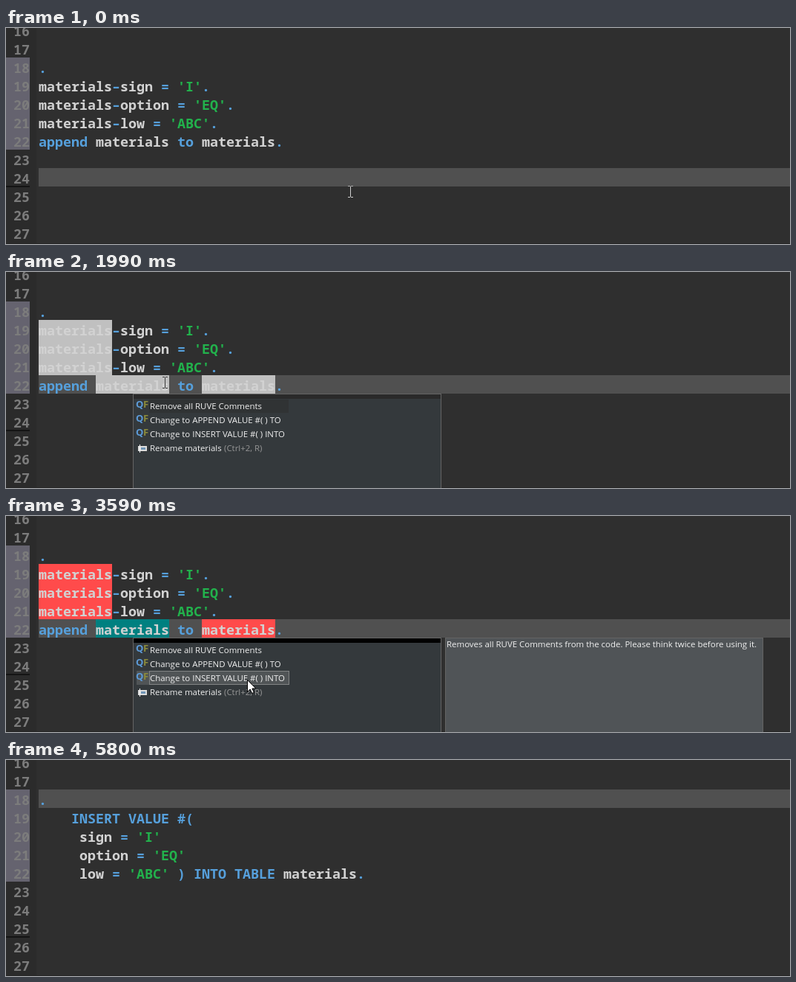
An HTML page with a canvas for the animation above (5860 ms loop, 1057 by 293 pixels).

```html
<!DOCTYPE html>
<html lang="en">
<head>
<meta charset="utf-8">
<title>Code editor quick fix</title>
<style>
html, body { margin: 0; width: 100%; height: 100%; overflow: hidden; background: #2f2f2f; }
canvas { display: block; }
</style>
</head>
<body>
<canvas id="stage" width="1057" height="293"></canvas>
<script>
const ctx = document.getElementById('stage').getContext('2d');
const W = 1057, H = 293, LOOP = 5860, STEP = 70;
const LEFT = 44, CHAR = 11, LINE = 25, ROW = 19;
const MONO = '600 18.333px "Noto Sans Mono", "DejaVu Sans Mono", monospace';
const UI = '11.45px "Open Sans", "Noto Sans", sans-serif';
const ICON = 'bold 13px "Open Sans", sans-serif';
const PLAIN = '#d2d2d2', BLUE = '#56a0dc', GREEN = '#22b24c';
const CARET = '#d0d0d0', BORDER = '#646464';

// Key moments in ms
const T = {
  click: 690, mark: 1840, menu: 1910, info: 2500, occur: 2780, focus: 3190,
  pick: 3260, infoOff: 3720, press: 3850, close: 4190, replace: 4400, colour: 5270
};

const before = [
  '.',
  "materials-sign = 'I'.",
  "materials-option = 'EQ'.",
  "materials-low = 'ABC'.",
  'append materials to materials.'
];
const after = [
  '.',
  '    INSERT VALUE #(',
  "     sign = 'I'",
  "     option = 'EQ'",
  "     low = 'ABC' ) INTO TABLE materials."
];
const menu = [
  'Remove all RUVE Comments',
  'Change to APPEND VALUE #( ) TO',
  'Change to INSERT VALUE #( ) INTO',
  'Rename materials'
];
const infoText = 'Removes all RUVE Comments from the code. Please think twice before using it.';

// Pointer moves: start, end, target point, upward bow
const moves = [
  [0, 620, 165, 155, 25],
  [960, 1170, 125, 164],
  [1500, 1660, 219, 151],
  [T.mark, T.menu, 214, 150],
  [T.info - STEP, T.info, 250, 154],
  [T.info, 2990, 161, 148],
  [T.focus - STEP, T.pick, 326, 222],
  [T.close + STEP, 4540, 333, 275]
];

const lineY = n => 40 + LINE * (n - 18);
const within = (t, a, b) => t >= a && t < b;

function pointerAt(t) {
  let x = 464, y = 222;
  for (const [a, b, toX, toY, bow = 0] of moves) {
    if (t < a) break;
    const u = t >= b ? 1 : Math.floor((t - a) / STEP) * STEP / (b - a);
    const ease = (1 - Math.cos(Math.PI * u)) / 2;
    x += (toX - x) * ease;
    y += (toY - y) * ease - bow * Math.sin(Math.PI * u);
  }
  return [Math.round(x), Math.round(y)];
}

function box(x, y, w, h, fill) {
  ctx.fillStyle = fill;
  ctx.fillRect(x, y, w, h);
}

function frame(x, y, w, h, stroke) {
  ctx.strokeStyle = stroke;
  ctx.strokeRect(x + .5, y + .5, w - 1, h - 1);
}

function text(str, x, y, fill, font) {
  ctx.font = font;
  ctx.fillStyle = fill;
  ctx.fillText(str, x, y);
}

function tokenColour(s) {
  if (s[0] === "'") return GREEN;
  return /^(append|to|INSERT|VALUE|INTO|TABLE|[^\w])$/.test(s) ? BLUE : PLAIN;
}

function drawCode(lines, coloured) {
  lines.forEach((line, i) => {
    for (const { 0: token, index } of line.matchAll(/'[^']*'|\w+|[^\w\s]/g)) {
      // The editor font has a hyphen as wide as its cell
      text(token === '-' ? '–' : token, LEFT + index * CHAR, lineY(18 + i) + 21,
        coloured ? tokenColour(token) : PLAIN, MONO);
    }
  });
}

function drawMarks(t) {
  before.forEach((line, i) => {
    for (const { index } of line.matchAll(/materials/g)) {
      const own = line.startsWith('append') && index < 10;
      const fill = t < T.occur ? '#c0c0c0' : own ? '#008080' : '#ff4b4b';
      box(LEFT + index * CHAR, lineY(18 + i), 9 * CHAR, LINE, fill);
    }
  });
}

function drawGutter(t) {
  box(0, 0, 41, H, '#2b2b2b');
  box(0, lineY(18), 32, 5 * LINE, '#65636f');
  box(0, lineY(t < T.replace ? 25 : 26) - 1, 32, 2, '#141414');
  for (let n = 16; n <= 27; n++) text(n, 10, lineY(n) + 21, '#7c7c7c', MONO);
}

function drawCaret(t) {
  const caret = (from, to, x, line, fill = CARET) =>
    within(t, from, to) && box(x, lineY(line), 2, LINE, fill);
  caret(350, T.click, LEFT, 24);
  caret(T.click, 1370, 165, 22);
  caret(T.info, T.occur, 165, 22, '#484848');
  caret(4610, 5800, LEFT + CHAR, 18);
}

function drawMenu(t) {
  box(171, 165, 416, 128, '#34393c');
  box(172, 166, 414, 6, t < T.focus ? '#2a2a2a' : '#000');
  frame(171, 165, 416, 140, BORDER);
  if (t < T.pick) box(193, 173, 188, 18, '#303334');
  else {
    box(176, 210, 206, ROW, '#505456');
    ctx.setLineDash([1, 1]);
    frame(193, 210, 189, ROW, '#b4b4b4');
    ctx.setLineDash([]);
  }
  menu.forEach((label, i) => {
    const y = 186 + ROW * i;
    text(label, 194, y, '#f0f0f0', UI);
    if (label.startsWith('Rename')) {
      box(178, y - 7, 12, 7, '#dcdcdc');
      box(182, y - 5, 6, 3, '#6f94b5');
      box(180, y - 9, 1, 11, '#f4f4f4');
      text('(Ctrl+2, R)', 294, y, '#969696', UI);
    } else {
      text('Q', 175, y - 2, '#5d9bd8', ICON);
      text('F', 185, y - 2, '#8c8c3c', ICON);
    }
  });
}

function drawInfo() {
  box(592, 165, 429, 128, '#505457');
  frame(592, 165, 429, 140, BORDER);
  text(infoText, 594, 178, '#f0f0f0', UI);
}

function drawClick(x, y) {
  ctx.fillStyle = 'rgba(255,255,0,.47)';
  ctx.beginPath();
  ctx.arc(x, y, 12, 0, Math.PI * 2);
  ctx.fill();
}

// Text pointer, inverting what lies below
function drawBeam(x, y) {
  ctx.globalCompositeOperation = 'difference';
  box(x, y - 7, 1, 14, '#fff');
  for (const edge of [-8, 7])
    for (const side of [-3, 1]) box(x + side, y + edge, 3, 1, '#fff');
  ctx.globalCompositeOperation = 'source-over';
}

const arrow = new Path2D('M.5 .5V16.5L4.2 13L6.7 18.5L9.3 17.4L6.9 12H11.8Z');
function drawArrow(x, y) {
  ctx.save();
  ctx.translate(x - 1, y);
  ctx.fillStyle = '#fff';
  ctx.strokeStyle = '#000';
  ctx.fill(arrow);
  ctx.stroke(arrow);
  ctx.restore();
}

function render(t) {
  box(0, 0, W, H, '#2f2f2f');
  drawGutter(t);
  const row = t < T.click ? 24 : t < T.replace ? 22 : 18;
  box(LEFT, lineY(row), W - LEFT, LINE, '#505050');
  if (within(t, T.mark, T.replace)) drawMarks(t);
  if (t < T.replace) drawCode(before, true);
  else drawCode(after, t >= T.colour);
  drawCaret(t);
  box(0, H - 1, W, 1, '#262626');
  if (within(t, T.menu, T.close)) drawMenu(t);
  if (within(t, T.info, T.infoOff)) drawInfo();
  if (within(t, T.click, 1030)) drawClick(164.5, 154.5);
  if (within(t, T.press, T.close + STEP)) drawClick(325, 222);
  if (t < 4540) (t < T.focus ? drawBeam : drawArrow)(...pointerAt(t));
}

const start = performance.now();
function tick() {
  render((performance.now() - start) % LOOP);
  requestAnimationFrame(tick);
}
tick();
</script>
</body>
</html>
```
